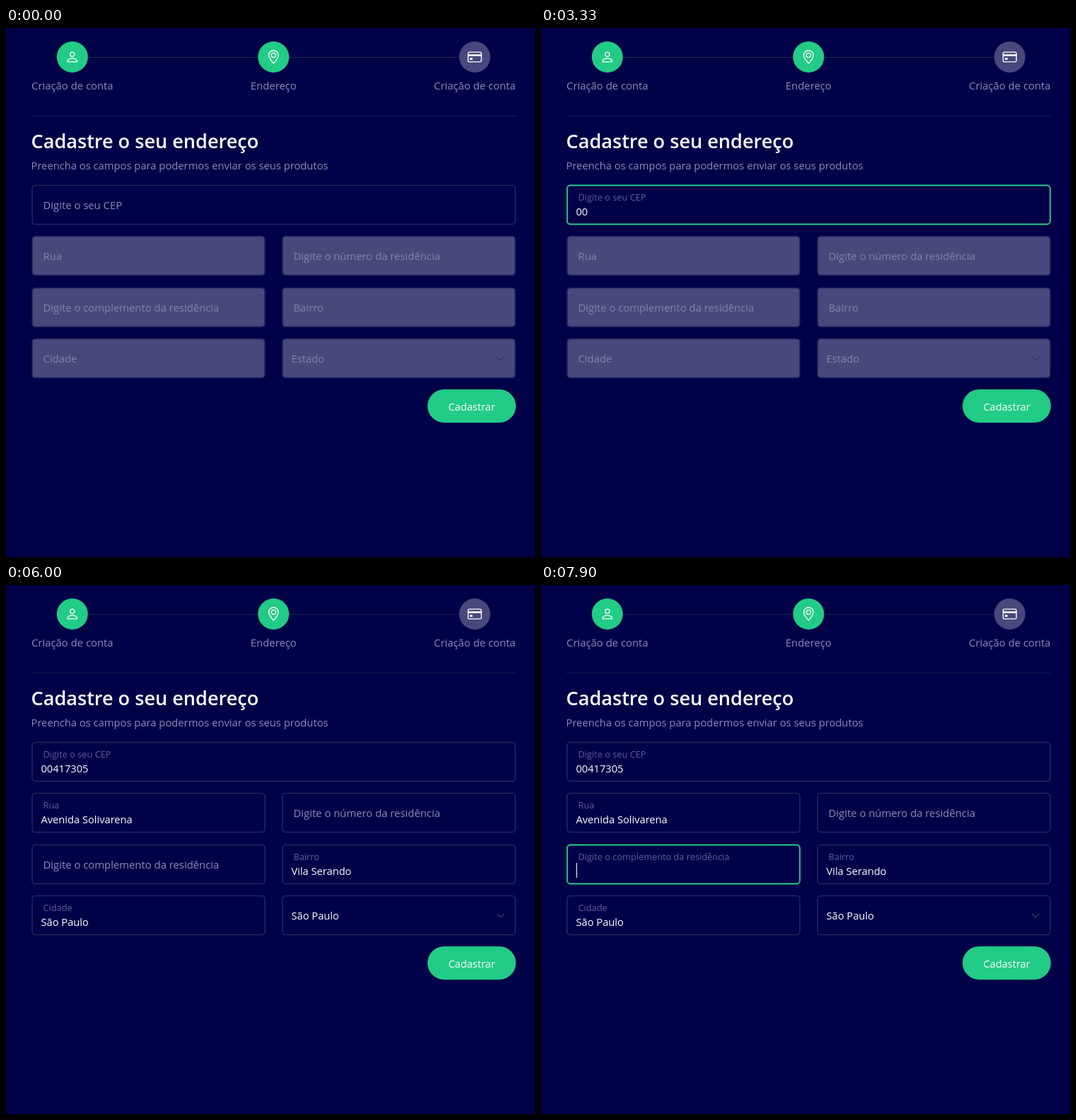
Write an HTML page with a canvas that moves like this. It is 748 px wide and 748 px high and loops after 8000 ms.

```html
<!DOCTYPE html>
<html lang="pt-BR">
<head>
<meta charset="utf-8">
<title>Cadastro</title>
<style>
  html, body { margin: 0; width: 100%; height: 100%; overflow: hidden; background: #000048; }
  canvas { display: block; width: 748px; height: 748px; }
</style>
</head>
<body>
<canvas id="stage"></canvas>
<script>
const LOOP = 8000, SIZE = 748, BLINK = 530;
const FONT = '"Open Sans", "Noto Sans", sans-serif';
const C = {
  bg: '#000048', green: '#22cb86', gray: '#48487c', text: '#8b8cb9', dimText: '#8282ad',
  white: '#ffffff', border: '#21275c', line: '#1f2658', rule: '#15194f', offBorder: '#20225c'
};

const canvas = document.getElementById('stage');
const ctx = canvas.getContext('2d');
const dpr = window.devicePixelRatio || 1;
canvas.width = canvas.height = SIZE * dpr;

// Timeline in ms
const KEYS = [2500, 2800, 4030, 4200, 4570, 4800, 4960, 5100];
const ENABLE = 5110, BLUR = 5325, FILL = 5340, LABELS = 5370;
const CEP = '00417305';

const fields = [
  { row: 0, x: 37, w: 683, label: 'Digite o seu CEP', focus: [540, BLUR], float: [540, LOOP], open: true },
  { row: 1, x: 37, label: 'Rua', value: 'Avenida Solivarena', float: [LABELS, LOOP] },
  { row: 1, x: 391, label: 'Digite o número da residência', focus: [6550, 7650], float: [6550, 7650] },
  { row: 2, x: 37, label: 'Digite o complemento da residência', focus: [7650, LOOP], float: [7650, LOOP] },
  { row: 2, x: 391, label: 'Bairro', value: 'Vila Serando', float: [LABELS, LOOP] },
  { row: 3, x: 37, label: 'Cidade', value: 'São Paulo', float: [LABELS, LOOP] },
  { row: 3, x: 391, label: 'Estado', value: 'São Paulo', select: true }
];

const clamp = v => Math.min(1, Math.max(0, v));
const mix = (a, b, k) => a + (b - a) * k;
const ease = k => k * k * (3 - 2 * k);

// 0..1 level of a state that is on during [start, end)
function level(span, t, duration) {
  if (!span) return 0;
  return ease(clamp((t - span[0]) / duration)) - ease(clamp((t - span[1]) / duration));
}

function setFont(size, weight) {
  ctx.font = `${weight} ${size}px ${FONT}`;
}

function text(str, x, y, size, color, align = 'left', weight = 400) {
  setFont(size, weight);
  ctx.textAlign = align;
  ctx.fillStyle = color;
  ctx.fillText(str, x, y);
}

function valueText(str, x, y) {
  text(str, x, y, 14.65, C.white, 'left', 500);
}

function box(x, y, w, h, r) {
  ctx.beginPath();
  ctx.roundRect(x, y, w, h, r);
}

function stroke(color, width) {
  ctx.strokeStyle = color;
  ctx.lineWidth = width;
  ctx.stroke();
}

function rule(x1, x2, y, color) {
  ctx.beginPath();
  ctx.moveTo(x1, y);
  ctx.lineTo(x2, y);
  stroke(color, 1);
}

// Icons on a 16 unit grid
const icons = {
  person: new Path2D('M10.5 5a2.5 2.5 0 1 1-5 0a2.5 2.5 0 0 1 5 0zM2.6 13c0-1 1-3.5 5.4-3.5s5.4 2.5 5.4 3.5q0 .5-.6 .5H3.2q-.6 0-.6-.5z'),
  pin: new Path2D('M8 15.2C5.5 12.4 2.6 9.2 2.6 6a5.4 5.4 0 0 1 10.8 0c0 3.2-2.9 6.4-5.4 9.2zM10.5 6a2.5 2.5 0 1 1-5 0a2.5 2.5 0 0 1 5 0z'),
  card: new Path2D('M2 2.5h12a1.5 1.5 0 0 1 1.5 1.5v8a1.5 1.5 0 0 1-1.5 1.5H2a1.5 1.5 0 0 1-1.5-1.5V4A1.5 1.5 0 0 1 2 2.5z'),
  cardFill: new Path2D('M.5 5h15v2H.5zM2.5 9h3v2.2h-3z')
};

function step(x, color, label, icon, fillIcon) {
  ctx.beginPath();
  ctx.arc(x, 41, 22, 0, Math.PI * 2);
  ctx.fillStyle = color;
  ctx.fill();
  ctx.save();
  ctx.translate(x - 10, 31);
  ctx.scale(1.25, 1.25);
  ctx.strokeStyle = ctx.fillStyle = C.white;
  ctx.lineWidth = 1.1;
  ctx.stroke(icon);
  if (fillIcon) ctx.fill(fillIcon);
  ctx.restore();
  text(label, x, 87, 14.85, C.text, 'center');
}

function header() {
  rule(116, 356, 41.5, C.line);
  rule(400, 641, 41.5, C.line);
  step(93.8, C.green, 'Criação de conta', icons.person);
  step(378.3, C.green, 'Endereço', icons.pin);
  step(662.8, C.gray, 'Criação de conta', icons.card, icons.cardFill);
  rule(36, 721, 124.5, C.rule);
  text('Cadastre o seu endereço', 35.5, 170, 27.1, C.white, 'left', 600);
  text('Preencha os campos para podermos enviar os seus produtos', 35.5, 200, 14.75, C.text);
}

function chevron(x, y, color) {
  ctx.beginPath();
  ctx.moveTo(x - 5, y - 2.5);
  ctx.lineTo(x, y + 2.5);
  ctx.lineTo(x + 5, y - 2.5);
  stroke(color, 1.4);
}

function caret(f, value, y, t) {
  if (!f.focus || t < f.focus[0] || t >= f.focus[1]) return;
  const typed = f.row === 0 ? KEYS.filter(k => k <= t) : [];
  const last = typed.length ? typed[typed.length - 1] : f.focus[0];
  if ((t - last) % (2 * BLINK) >= BLINK) return;
  setFont(14.65, 500);
  ctx.fillStyle = C.white;
  ctx.fillRect(Math.round(f.x + 13 + ctx.measureText(value).width), y + 26, 1, 21);
}

function drawField(f, t) {
  const y = Math.round(222 + 72.4 * f.row), w = f.w || 329;
  const enabled = f.open || t >= ENABLE;
  const filled = t >= FILL;
  const focus = level(f.focus, t, 150);

  box(f.x, y + 0.5, w, 55, 4.5);
  if (!enabled) {
    ctx.fillStyle = C.gray;
    ctx.fill();
  }
  stroke(enabled ? C.border : C.offBorder, 1.6);
  if (focus > 0) {
    ctx.globalAlpha = focus;
    stroke(C.green, 1.8);
    ctx.globalAlpha = 1;
  }

  const labelColor = enabled ? C.text : C.dimText;
  if (f.select) {
    if (filled) valueText(f.value, f.x + 12.5, y + 34);
    else text(f.label, f.x + 12.5, y + 34, 14.75, labelColor);
    chevron(699.5, y + 28.5, enabled ? '#343963' : '#34366c');
    return;
  }

  const k = level(f.float, t, 100);
  ctx.save();
  ctx.globalAlpha = mix(1, 0.68, k);
  ctx.translate(f.x + 15.5, y + mix(34, 22, k));
  ctx.scale(mix(1, 0.86, k), mix(1, 0.86, k));
  text(f.label, 0, 0, 14.85, labelColor);
  ctx.restore();

  const value = f.row === 0 ? CEP.slice(0, KEYS.filter(key => key <= t).length)
    : filled && f.value || '';
  valueText(value, f.x + 12.5, y + 42.5);
  caret(f, value, y, t);
}

function button() {
  box(596, 511, 125, 47, 23.5);
  ctx.fillStyle = C.green;
  ctx.fill();
  text('Cadastrar', 658.5, 540.5, 14.6, C.white, 'center');
}

function draw() {
  const t = performance.now() % LOOP;
  ctx.setTransform(dpr, 0, 0, dpr, 0, 0);
  ctx.fillStyle = C.bg;
  ctx.fillRect(0, 0, SIZE, SIZE);
  header();
  fields.forEach(f => drawField(f, t));
  button();
  requestAnimationFrame(draw);
}
draw();
</script>
</body>
</html>
```
